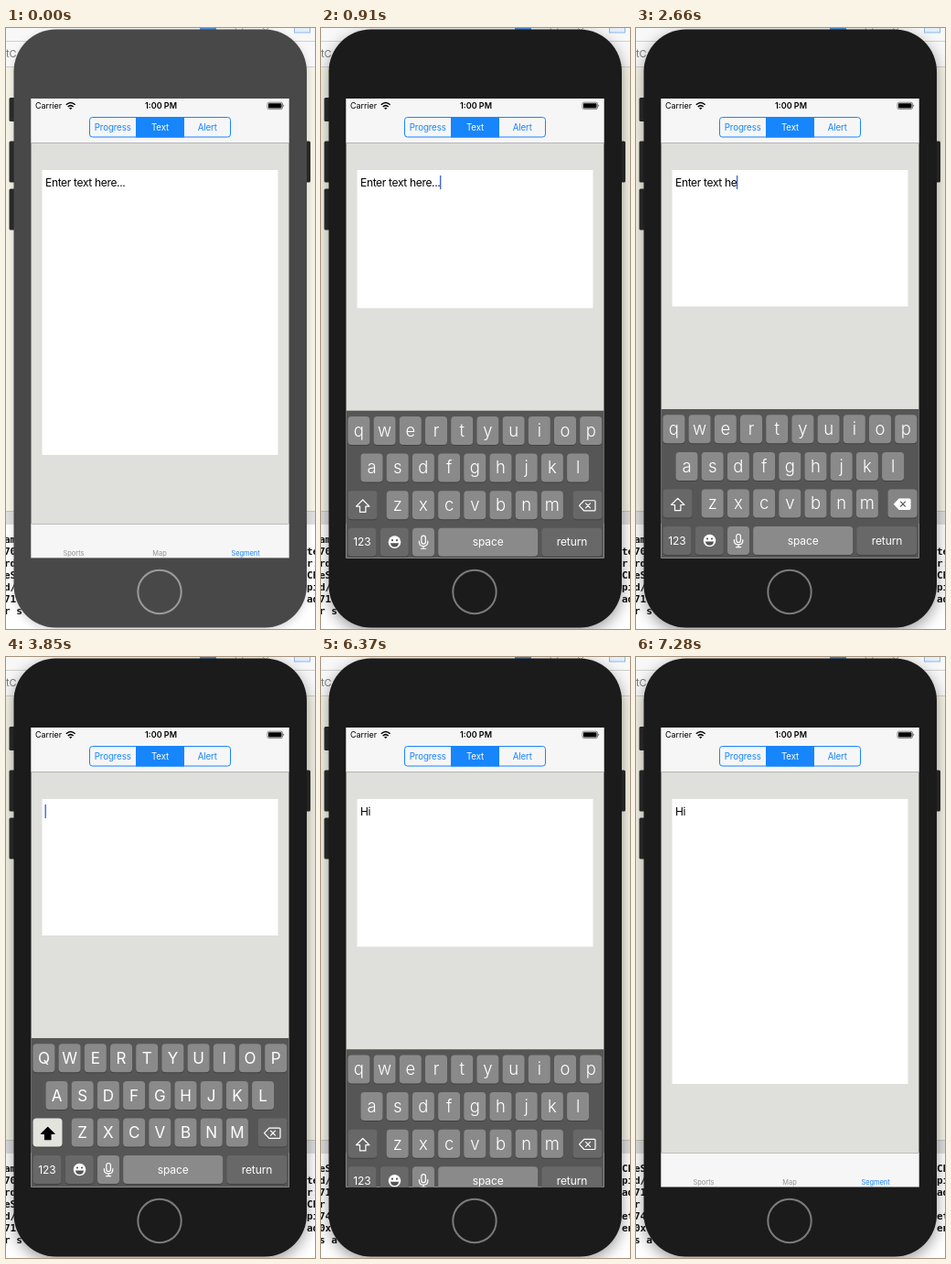
Animation, 338 px wide and 656 px high, one loop 7.35 s. Source, as an HTML page:

```html
<!DOCTYPE html>
<html lang="en">
<head>
<meta charset="utf-8">
<title>Text entry demo</title>
<style>
  html, body { margin: 0; width: 100%; height: 100%; overflow: hidden; background: #fff; }
  svg { display: block; width: 338px; height: 656px; font-family: Inter, Roboto, sans-serif; }
  text { white-space: pre; }
  .mid { text-anchor: middle; }
  .console { font: bold 11px "DejaVu Sans Mono", monospace; fill: #111; }
  .body { fill: #484848; filter: drop-shadow(0 3px 4px rgba(0,0,0,.16)); }
  .ring { fill: none; stroke: #9b9b9b; stroke-width: 2; }
  .active .body { fill: #1b1b1b; filter: drop-shadow(0 5px 8px rgba(0,0,0,.38)); }
  .active .ring { stroke: #7b7b7b; }
  .blue { fill: #1785fb; }
  .seg { font-size: 9.7px; letter-spacing: -.1px; }
  .tab { font-size: 7.4px; fill: #929292; }
  .entry { font-size: 12px; letter-spacing: -.33px; }
  .key { fill: #8a8a8a; }
  .dark { fill: #686868; }
  .shade { fill: #414141; }
  .letter { font-size: 18.5px; fill: #fff; font-weight: 300; }
  .upper .letter { font-size: 17px; font-weight: 400; }
  .word { font-size: 12px; fill: #fff; letter-spacing: -.1px; }
  .line { fill: none; stroke: #fff; stroke-width: 1.2; stroke-linejoin: round; stroke-linecap: round; }
  .upper .shiftKey { fill: #e4e4df; }
  .upper .arrow { fill: #000; stroke: #000; }
  .deleting .deleteKey { fill: #858585; }
  .deleting .deleteIcon { fill: #fff; }
  .deleting .cross { stroke: #555; }
</style>
</head>
<body>
<svg id="stage" viewBox="0 0 338 656">
  <defs>
    <clipPath id="screen"><rect x="27.5" y="77" width="282" height="501.5"/></clipPath>
  </defs>

  <!-- Windows behind the phone -->
  <rect width="338" height="656" fill="#f5f3e6"/>
  <rect width="338" height="42" fill="#f8f8f8"/>
  <path d="M0 14.5H338M0 42.5H338" stroke="#cfcfcf"/>
  <text x="0" y="32" font-size="11" fill="#777">tC</text>
  <rect x="212" width="18" height="2.5" fill="#4c8fdc"/>
  <path d="M251 0a4 4 0 0 0 8 0M281 0l3 3 3-3" fill="none" stroke="#aaa"/>
  <rect x="315.5" y="-4" width="17" height="9" fill="#e3eefb" stroke="#8db7e8"/>
  <rect y="527" width="338" height="15" fill="#dedede"/>
  <path d="M0 527.5H338" stroke="#c2c2c2"/>
  <rect y="542" width="338" height="114" fill="#fff"/>
  <g id="console" class="console"></g>

  <!-- Phone -->
  <g fill="#2b2b2b">
    <rect x="3.5" y="76" width="8" height="26" rx="1.5"/>
    <rect x="3.5" y="123.5" width="8" height="45" rx="1.5"/>
    <rect x="3.5" y="175.5" width="8" height="45" rx="1.5"/>
    <rect x="325" y="123.5" width="8" height="45" rx="1.5"/>
  </g>
  <rect class="body" x="8.5" y="1.5" width="320.5" height="653" rx="46"/>
  <circle class="ring" cx="168" cy="615.5" r="23.7"/>

  <g clip-path="url(#screen)">
    <rect x="27" y="77" width="283" height="502" fill="#dfe0db"/>
    <rect x="27" y="77" width="283" height="48" fill="#f6f6f7"/>
    <path d="M27 125.5H310" stroke="#b4b4b6"/>

    <!-- Status bar -->
    <text x="32" y="88" font-size="9" letter-spacing="-.05">Carrier</text>
    <g fill="none" stroke="#000" stroke-width="1.5">
      <path d="M65.8 83.8q4.9-4.6 9.8 0M67.7 86q3-2.7 6 0"/>
    </g>
    <path d="M69 87.4q1.7-1.5 3.4 0l-1.7 1.7z"/>
    <text class="mid" x="169.5" y="88" font-size="9" font-weight="600">1:00 PM</text>
    <rect x="286" y="81.2" width="16.5" height="7.4" rx="1.6" fill="#f6f6f7" stroke="#555" stroke-width=".7"/>
    <rect x="287" y="82.2" width="14.5" height="5.4" rx=".8"/>
    <path d="M303.5 83.6q1.5 1.3 0 2.6z"/>

    <!-- Segmented control -->
    <rect x="91.5" y="97.5" width="154" height="21.5" rx="3" fill="none" stroke="#1785fb"/>
    <rect class="blue" x="142" y="97" width="53" height="22.5"/>
    <g class="seg mid blue">
      <text x="116.7" y="112">Progress</text>
      <text x="168.5" y="112" style="fill:#fff">Text</text>
      <text x="220.3" y="112">Alert</text>
    </g>

    <!-- Tab bar -->
    <rect x="27" y="541" width="283" height="38" fill="#f6f6f7"/>
    <path d="M27 541.5H310" stroke="#bcbdbd"/>
    <g class="tab mid">
      <text x="74" y="576">Sports</text>
      <text x="168" y="576">Map</text>
      <text x="262" y="576" class="blue">Segment</text>
    </g>

    <!-- Text area -->
    <rect id="area" x="39.5" y="155" width="258" height="311" fill="#fff"/>
    <text id="entry" class="entry" x="43" y="173"></text>
    <rect id="caret" y="161" width="1.4" height="15" fill="#4568cf"/>

    <g id="keyboard">
      <rect x="27" width="283" height="165" fill="#565656"/>
      <g id="keys"></g>
      <path class="line arrow" d="M45.7 97.3l7.2 7.2h-4v6.2h-6.4v-6.2h-4z"/>
      <path class="line deleteIcon" d="M282.5 103.7l5.3-5.6h11.2q1 0 1 1v9.2q0 1-1 1h-11.2z"/>
      <path class="line cross" d="M289.5 101.2l5 5m0-5l-5 5"/>
      <circle cx="80.5" cy="143.5" r="6.8" fill="#fff"/>
      <path d="M76 144.5h9q-.6 4.3-4.5 4.3t-4.5-4.3z" fill="#555"/>
      <circle cx="78" cy="141.5" r="1.1" fill="#555"/>
      <circle cx="83" cy="141.5" r="1.1" fill="#555"/>
      <rect class="line" x="109.8" y="136.5" width="4.6" height="9" rx="2.3"/>
      <path class="line" d="M107.4 142.5v1.2q0 4.2 4.7 4.2t4.7-4.2v-1.2M112.1 148v2.6M109.5 150.6h5.2"/>
    </g>
  </g>
</svg>
<script>
const LOOP = 7350, STEP = 70;
const FOCUS = 420, OPEN = 470, CLOSE = 6340;
const HOLD = 1830, REPEAT_DELAY = 500, REPEAT = 85;
const TYPE_H = 4060, TYPE_I = 4550;
const KB_TOP = 416, KB_HEIGHT = 162;
const START = "Enter text here...";
const CLEARED = HOLD + REPEAT_DELAY + (START.length - 2) * REPEAT;

const $ = id => document.getElementById(id);
const stage = $("stage"), entry = $("entry"), caret = $("caret");

function add(parent, tag, attrs, text = "") {
  const el = document.createElementNS("http://www.w3.org/2000/svg", tag);
  for (const name in attrs) el.setAttribute(name, attrs[name]);
  el.textContent = text;
  parent.append(el);
  return el;
}

function addKey(x, y, width, cls) {
  const box = { x, width, height: 31, rx: 4 };
  add($("keys"), "rect", { ...box, y: y + 1, class: "shade" });
  add($("keys"), "rect", { ...box, y, class: cls });
}

const letters = [];
["qwertyuiop", "asdfghjkl", "zxcvbnm"].forEach((row, r) => {
  const first = [41.4, 55.5, 83.7][r], y = 6.3 + r * 40.6;
  [...row].forEach((ch, i) => {
    const x = first + i * 28.2;
    addKey(x - 12, y, 24, "key");
    letters.push(add($("keys"), "text", { x, y: y + 21.8, class: "letter mid" }, ch));
  });
});
addKey(29.5, 87.5, 32, "dark shiftKey");
addKey(275.5, 87.5, 32, "dark deleteKey");
addKey(29.5, 128, 31, "dark");
addKey(64.8, 128, 31, "dark");
addKey(100, 128, 24, "key");
addKey(128.2, 128, 109, "key");
addKey(241.3, 128, 66, "dark");
[[45, "123"], [182.7, "space"], [274.5, "return"]].forEach(([x, word]) =>
  add($("keys"), "text", { x, y: 147.8, class: "word mid" }, word));

const logLeft = ["am", "70", "rd", "eS", "d/", "71", "r s", "74", "0x", "s a"];
const logRight = ["", "te", "r:", "Ch", "pi", "ad", "", "et", "en", ""];
const logRows = logLeft.map((left, i) => {
  const row = add($("console"), "g", {});
  add(row, "text", { x: -2, y: 562 + i * 13 }, left);
  add(row, "text", { x: 329, y: 562 + i * 13 }, logRight[i]);
  return row;
});

// Critically damped slide, 0 to 1
function settle(ms) {
  const x = Math.max(0, ms) * 0.015;
  return 1 - (1 + x) * Math.exp(-x);
}

function deletedCount(t) {
  if (t < HOLD) return 0;
  const held = t - HOLD - REPEAT_DELAY;
  return held < 0 ? 1 : Math.min(START.length, 2 + Math.floor(held / REPEAT));
}

function textAt(t) {
  if (t >= TYPE_I) return "Hi";
  if (t >= TYPE_H) return "H";
  return START.slice(0, START.length - deletedCount(t));
}

function lastInput(t) {
  if (t >= TYPE_I) return TYPE_I;
  if (t >= TYPE_H) return TYPE_H;
  if (t >= CLEARED) return CLEARED;
  if (t >= HOLD + REPEAT_DELAY) return t;
  return t >= HOLD ? HOLD : OPEN;
}

let shift = null;

function setShift(on) {
  if (on === shift) return;
  shift = on;
  for (const el of letters) {
    el.textContent = on ? el.textContent.toUpperCase() : el.textContent.toLowerCase();
  }
}

function draw(t) {
  const raised = settle(t - OPEN) - settle(t - CLOSE);
  const top = KB_TOP + KB_HEIGHT * (1 - raised);
  const upper = t >= CLEARED && t < TYPE_H;
  stage.classList.toggle("active", t >= FOCUS);
  stage.classList.toggle("upper", upper);
  stage.classList.toggle("deleting", t >= HOLD && t < CLEARED + 50);
  setShift(upper);

  $("keyboard").setAttribute("transform", `translate(0 ${top.toFixed(2)})`);
  $("area").setAttribute("height", (top - 112 - 155).toFixed(2));

  const text = textAt(t);
  entry.textContent = text;
  caret.setAttribute("x", 42.5 + (text ? entry.getComputedTextLength() : 0));
  const shown = t >= OPEN && t < CLOSE && (t - lastInput(t)) % 1000 < 560;
  caret.setAttribute("visibility", shown ? "visible" : "hidden");

  const scrolled = t >= TYPE_H;
  $("console").setAttribute("transform", `translate(0 ${scrolled ? -39 : 0})`);
  logRows.forEach((row, i) => {
    const visible = scrolled ? i > 2 : i < 7;
    row.setAttribute("visibility", visible ? "visible" : "hidden");
  });
}

function tick() {
  const t = performance.now() % LOOP;
  draw(Math.floor(t / STEP) * STEP);
  requestAnimationFrame(tick);
}
tick();
</script>
</body>
</html>
```
